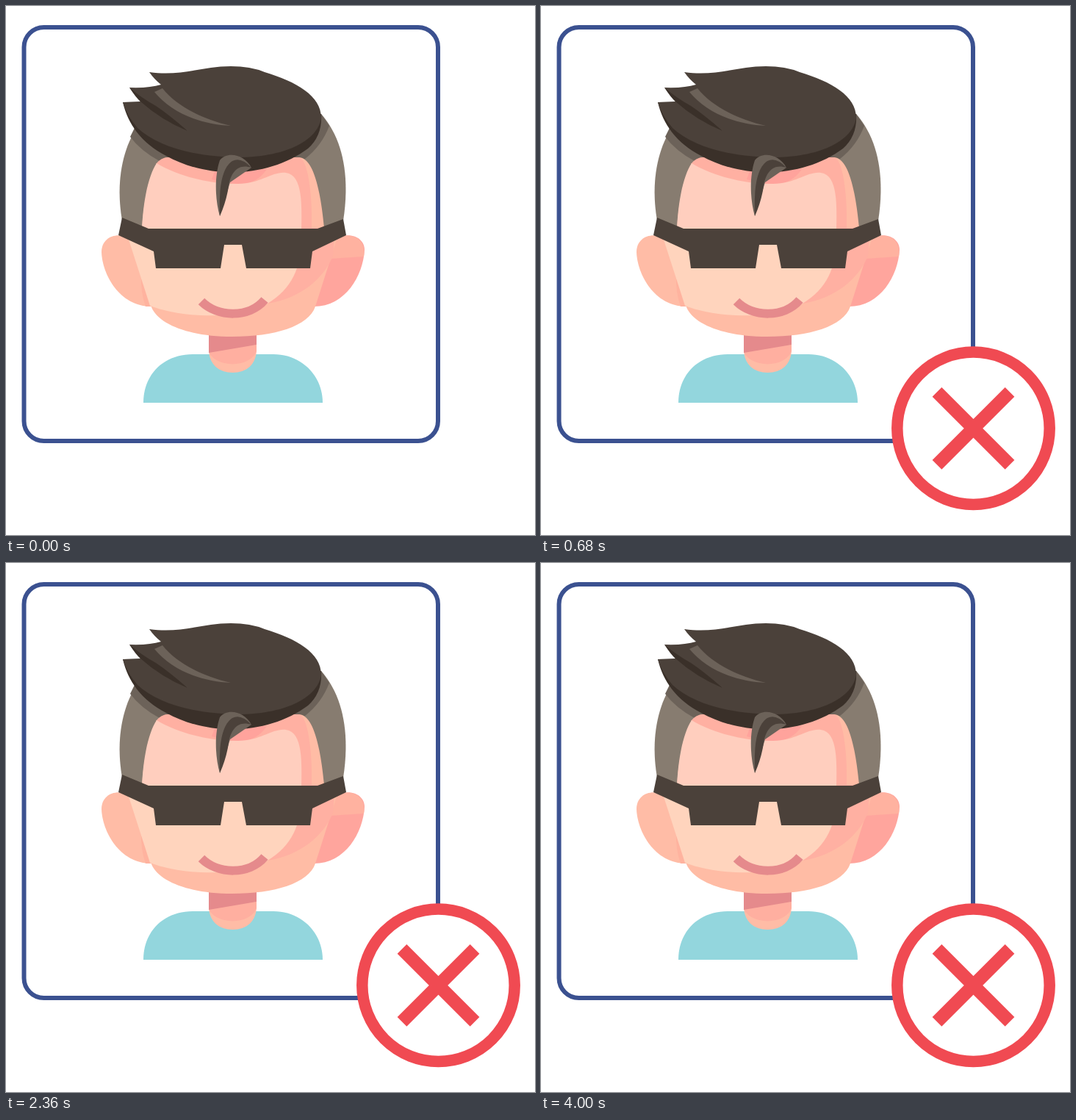
Write an HTML page that moves like this. It is 720 px wide and 720 px high and loops after 5000 ms.

```html
<!DOCTYPE html>
<html lang="en">
<head>
<meta charset="utf-8">
<title>Rejected profile</title>
<style>
  html, body { margin: 0; width: 100%; height: 100%; overflow: hidden; background: #fff; }
  svg { display: block; width: 100vw; height: 100vh; }
</style>
</head>
<body>
<svg viewBox="0 0 720 720">
  <rect x="24.5" y="29" width="563.5" height="563" rx="27" fill="#fff" stroke="#3b5190" stroke-width="6"/>

  <!-- shirt and neck -->
  <path fill="#93d6dd" d="M187 540C187 501 215 474 254 474H364C402 474 431 503 431 540Z"/>
  <path fill="#ffbca6" d="M276 440H341V467C341 488 327 499 308.500 499S276 488 276 467Z"/>
  <path fill="#ffafa0" d="M276 471L341 461V470C332 493 286 493 276 471Z"/>
  <path fill="#e58a8c" d="M276 440H341V461L276 472Z"/>

  <!-- ears -->
  <path fill="#ffbca6" d="M168 316C150 307 130 315 130 335C131 365 154 409 198 409Z"/>
  <path fill="#ffb39f" d="M184 365L198 409H190Q183 390 184 365Z"/>
  <path fill="#ffa59d" d="M449 316C468 307 488 315 488 332C486 367 462 409 419 409Z"/>
  <path fill="#ffb2a0" d="M449 316C468 307 491 315 487 341L440 344Z"/>

  <!-- shaved sides -->
  <path fill="#877c70" d="M183 158C158 192 149 240 158 292L194 304H424L459 292C468 235 460 182 429 147Z"/>
  <path fill="#6c6259" d="M177 162L169 178Q183 197 209 211L240 206L200 168ZM429 147L440 163Q430 190 407 208L380 206Z"/>

  <!-- face -->
  <path fill="#ffbca5" d="M185 304C188 255 199 206 221 206H398C416 206 427 240 433 302L450 318L421 409C412 436 365 450 308 450S208 434 198 410L167 318Z"/>
  <path fill="#ffb0a2" d="M204 215Q211 206 221 206H398C410 206 417 250 416 302H448L445 340C432 372 400 398 356 405L300 300Z"/>
  <path fill="#ffa39c" d="M285 222H355Q340 244 315 242Q296 241 280 236Z"/>
  <path fill="#ffcebe" d="M185 304C187 260 195 229 205 214C235 232 280 243 316 242C347 242 362 225 381 227C402 230 403 262 402 304Z"/>
  <path fill="#ffd4bd" d="M167 318L185 302H402C405 350 392 383 356 405C315 427 240 425 196 408Z"/>
  <path fill="none" stroke="#e58a8c" stroke-width="12" d="M266 402C288 424 331 425 352 400"/>

  <!-- glasses -->
  <path fill="#4b413a" d="M158 288L194 303H424L459 290L463 312L417 334L414 357H327L321 325H297L292 357H204L201 334L153 312Z"/>

  <!-- hair -->
  <path fill="#3a3029" d="M159 131C166 161 184 186 218 204C280 238 360 232 411 194Q431 176 429 147L300 130Z"/>
  <path fill="#4b413a" d="M195 90C240 96 266 82 306 82Q333 82 352 90C395 103 429 122 429 152C424 186 375 206 315 206C252 205 205 190 179 166Q165 150 159 131L183 130L168 111Q195 112 211 107Q202 100 195 90Z"/>
  <path fill="#3a3029" d="M168 111Q177 125 183 130Q211 155 247 170Q222 148 204 136Q184 125 168 111Z"/>
  <path fill="#6c6259" d="M202 117C224 144 262 161 306 163C266 154 231 135 213 112Z"/>
  <path fill="#6c6259" d="M291 286C284 262 284 230 291 210C301 197 325 202 334 220L305 240Z"/>
  <path fill="#4b413a" d="M291 286C290 258 291 222 308 211Q320 205 334 220C316 214 306 226 303 245Q300 266 291 286Z"/>

  <g id="badge">
    <circle cx="0" cy="0" r="103.700" fill="#fff" stroke="#f04a52" stroke-width="15.500"/>
    <path id="cross" stroke="#f04a52" stroke-width="18" d="M-49.500 -49.500L49.500 49.500M49.500 -49.500L-49.500 49.500"/>
  </g>
</svg>
<script>
const badge = document.getElementById('badge');
const cross = document.getElementById('cross');
const PERIOD = 100; // one pop of the badge, in 60 fps ticks

function easeBetween(from, to, tick) {
  const x = Math.min(1, Math.max(0, (tick - from) / (to - from)));
  return x * x * (3 - 2 * x);
}

function draw() {
  const step = Math.floor(performance.now() % 5000 / 40);
  const total = Math.floor(step * 12 / 5);
  // an exact end of a period still shows the finished badge
  const tick = total % PERIOD || Math.min(total, PERIOD);
  badge.setAttribute('transform', `translate(588.5 574.8) scale(${easeBetween(0, 12, tick)})`);
  cross.setAttribute('transform', `scale(${easeBetween(20, 40, tick)})`);
  requestAnimationFrame(draw);
}
draw();
</script>
</body>
</html>
```
